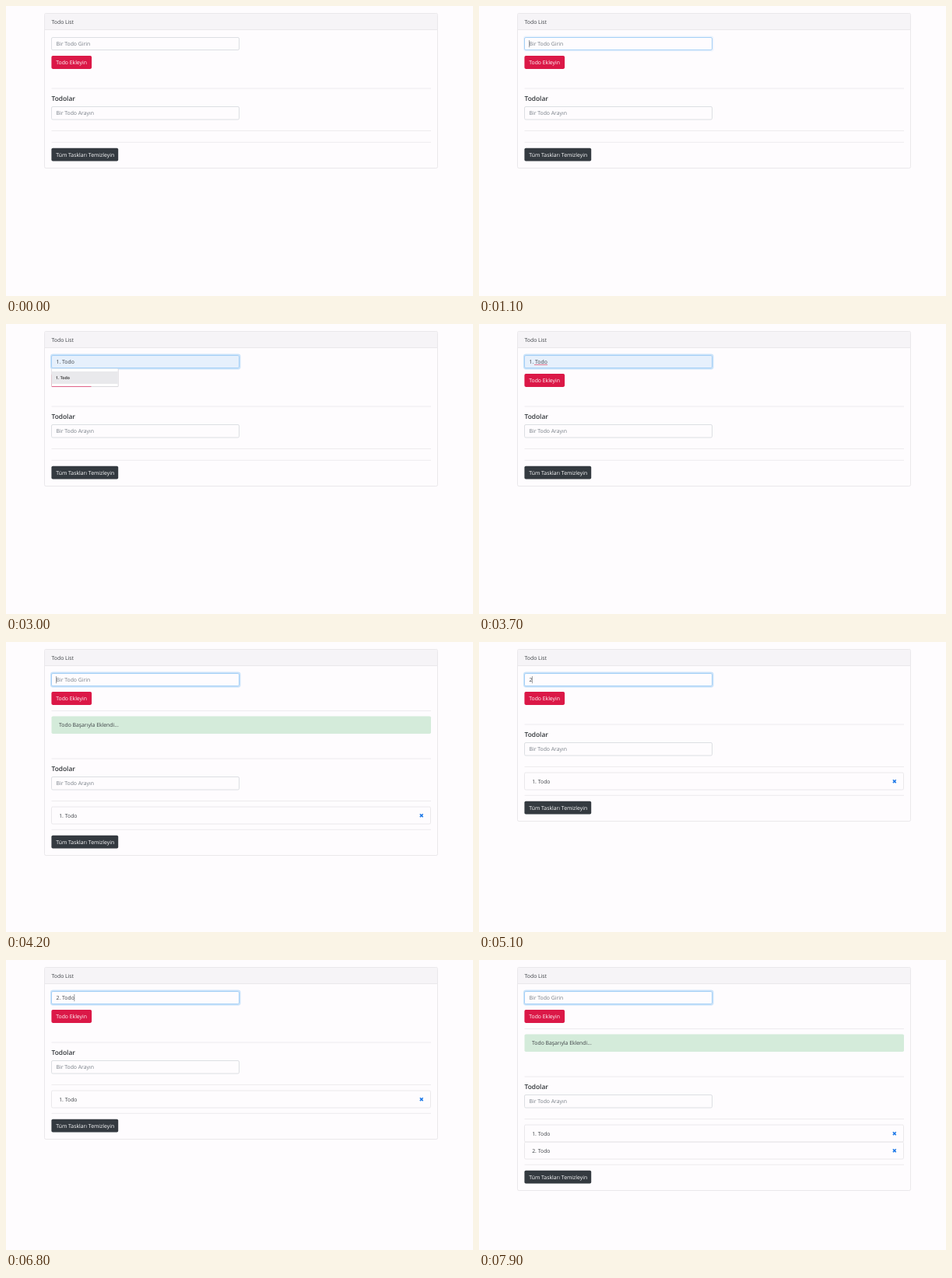
Recreate the animation shown at these times as an HTML page. Size 600x373 px, loop 8000 ms.

```html
<!DOCTYPE html>
<html lang="tr">
<head>
<meta charset="utf-8">
<title>Todo List</title>
<style>
html, body { margin: 0; width: 100%; height: 100%; overflow: hidden; background: #fefcfe; }
svg { display: block; width: 600px; height: 373px; }
text { font: 6.85px "Open Sans", "Noto Sans", sans-serif; fill: #3b3f44; white-space: pre; text-rendering: geometricPrecision; }
.hint { fill: #747c84; }
.light { fill: #fff; font-weight: 500; }
.title { font-size: 8.4px; font-weight: 600; fill: #303438; }
.small { font-size: 5.2px; font-weight: 600; fill: #222; }
.hr { stroke: #edebee; }
.box { fill: #fefcfe; stroke: #dcdfe3; }
.row { fill: none; stroke: #eae8eb; }
.cross { fill: none; stroke: #1f7ae8; stroke-width: 1.6; }
</style>
</head>
<body>
<svg id="stage" viewBox="0 0 600 373" xmlns="http://www.w3.org/2000/svg">
  <rect width="600" height="373" fill="#fefcfe"/>
  <rect id="card" class="row" x="49.5" y="9.5" width="505" height="199" rx="1.8"/>
  <path d="M50 30V11.3Q50 10 51.3 10H552.7Q554 10 554 11.3V30Z" fill="#f6f4f7"/>
  <path d="M50 30.5H554" stroke="#eae8eb"/>
  <text x="58.5" y="22.7">Todo List</text>

  <rect x="58.4" y="64.1" width="51.7" height="16.8" rx="1.8" fill="#db1847"/>
  <text class="light" x="64.2" y="75">Todo Ekleyin</text>

  <rect id="ring" x="57.8" y="39.3" width="242.9" height="18.4" rx="2.4" fill="none" stroke="#c8e2fa" stroke-width="1.5"/>
  <rect id="field" class="box" x="58.5" y="40.5" width="241" height="16" rx="1.6"/>
  <text id="hint" class="hint" x="64.5" y="51">Bir Todo Girin</text>
  <text id="value" x="64.5" y="51" fill="#555b61"></text>
  <path id="squiggle" fill="none" stroke="#e0405c" stroke-width=".7"/>
  <path id="caret" d="M0 44V53.2" stroke="#5a5e62" stroke-width=".6"/>

  <g id="alert">
    <path class="hr" d="M58.5 88.5H546"/>
    <rect x="58.5" y="95.5" width="487.5" height="22.5" rx="1.8" fill="#d4ebda"/>
    <text x="68" y="109" fill="#47564c">Todo Başarıyla Eklendi...</text>
  </g>

  <g id="lower">
    <path class="hr" d="M58.5 106H546"/>
    <text class="title" x="58.5" y="122">Todolar</text>
    <rect class="box" x="58.5" y="129.5" width="241" height="16.5" rx="1.6"/>
    <text class="hint" x="64.5" y="140.4">Bir Todo Arayın</text>
    <path class="hr" d="M58.5 160.5H546"/>
    <g id="rows"></g>
    <g id="foot">
      <path class="hr" d="M58.5 175.3H546"/>
      <rect x="58.4" y="182.8" width="85.8" height="16.7" rx="1.8" fill="#343a40"/>
      <text class="light" x="64.3" y="193.6">Tüm Taskları Temizleyin</text>
    </g>
  </g>

  <g id="menu">
    <rect x="58.3" y="57.6" width="86.2" height="23.2" rx=".8" fill="#cfced2"/>
    <rect x="58.8" y="57.6" width="85" height="22.4" rx=".6" fill="#fff"/>
    <path d="M58.8 80.5H109.4" stroke="#e0648a"/>
    <rect id="hover" x="58.8" y="61" width="85" height="16" fill="#e9e9ec"/>
    <text class="small" x="64" y="71">1. Todo</text>
  </g>
</svg>
<script>
const LOOP = 8000, PITCH = 22, ALERT = 44;
const $ = id => document.getElementById(id);
const show = (id, on) => $(id).style.display = on ? '' : 'none';
const last = (steps, t) => steps.filter(s => s[0] <= t).pop()[1];
const during = (t, from, to) => t >= from && t < to;

const typed = [
  [0, ''], [2000, '1'], [2100, '1.'], [2900, '1. Todo'], [4200, ''],
  [4900, '2'], [5200, '2.'], [5800, '2. '], [6400, '2. T'],
  [6600, '2. To'], [6800, '2. Todo'], [7400, '']
];
const blink = [
  [0, 0], [1100, 1], [1500, 0], [2000, 1], [2700, 0], [3200, 1], [3600, 0],
  [4200, 1], [4600, 0], [4900, 1], [5600, 0], [5800, 1], [6100, 0],
  [6200, 1], [7400, 1], [7900, 0]
];
const counts = [[0, 0], [4200, 1], [7400, 2]];

function row(i) {
  const y = 168 + i * PITCH, c = y + 11.2;
  return `<rect class="row" x="58.5" y="${y}" width="487" height="${PITCH}" rx="1.6"/>
    <text x="68.2" y="${y + 13.6}">${i + 1}. Todo</text>
    <path class="cross" d="M531.9 ${c - 1.9}l3.8 3.8m0 -3.8l-3.8 3.8"/>`;
}

function wave(x0, x1) {
  let d = `M${x0} 52.6`;
  for (let x = x0, k = 1; x < x1; x++, k = -k) d += `l1 ${-0.5 * k}`;
  return d;
}
$('squiggle').setAttribute('d', wave(71, 88));

let shownRows = -1;
function draw(t) {
  const text = last(typed, t), count = last(counts, t);
  const added = during(t, 4200, 5100) || t >= 7400;
  const filled = during(t, 2900, 4200);
  const focus = Math.min(1, Math.max(0, (t - 1050) / 150));

  $('value').textContent = text;
  show('hint', !text);
  const x = 64.5 + (text ? $('value').getComputedTextLength() : 0);
  $('caret').setAttribute('transform', `translate(${x} 0)`);
  show('caret', last(blink, t));
  show('squiggle', during(t, 3200, 4200));

  $('ring').style.opacity = focus;
  $('field').style.stroke = focus > 0 ? '#a6d0f6' : '';
  $('field').style.fill = filled ? '#e6f0fc' : '';
  show('menu', during(t, 1200, 3200));
  show('hover', during(t, 2900, 3200));

  show('alert', added);
  if (count !== shownRows) {
    $('rows').innerHTML = Array.from({ length: count }, (_, i) => row(i)).join('');
    shownRows = count;
  }
  const drop = added ? ALERT : 0;
  $('lower').setAttribute('transform', `translate(0 ${drop})`);
  $('foot').setAttribute('transform', `translate(0 ${count * PITCH})`);
  $('card').setAttribute('height', 199 + drop + count * PITCH);
}

const start = performance.now();
function tick() {
  draw((performance.now() - start) % LOOP);
  requestAnimationFrame(tick);
}
tick();
</script>
</body>
</html>
```
